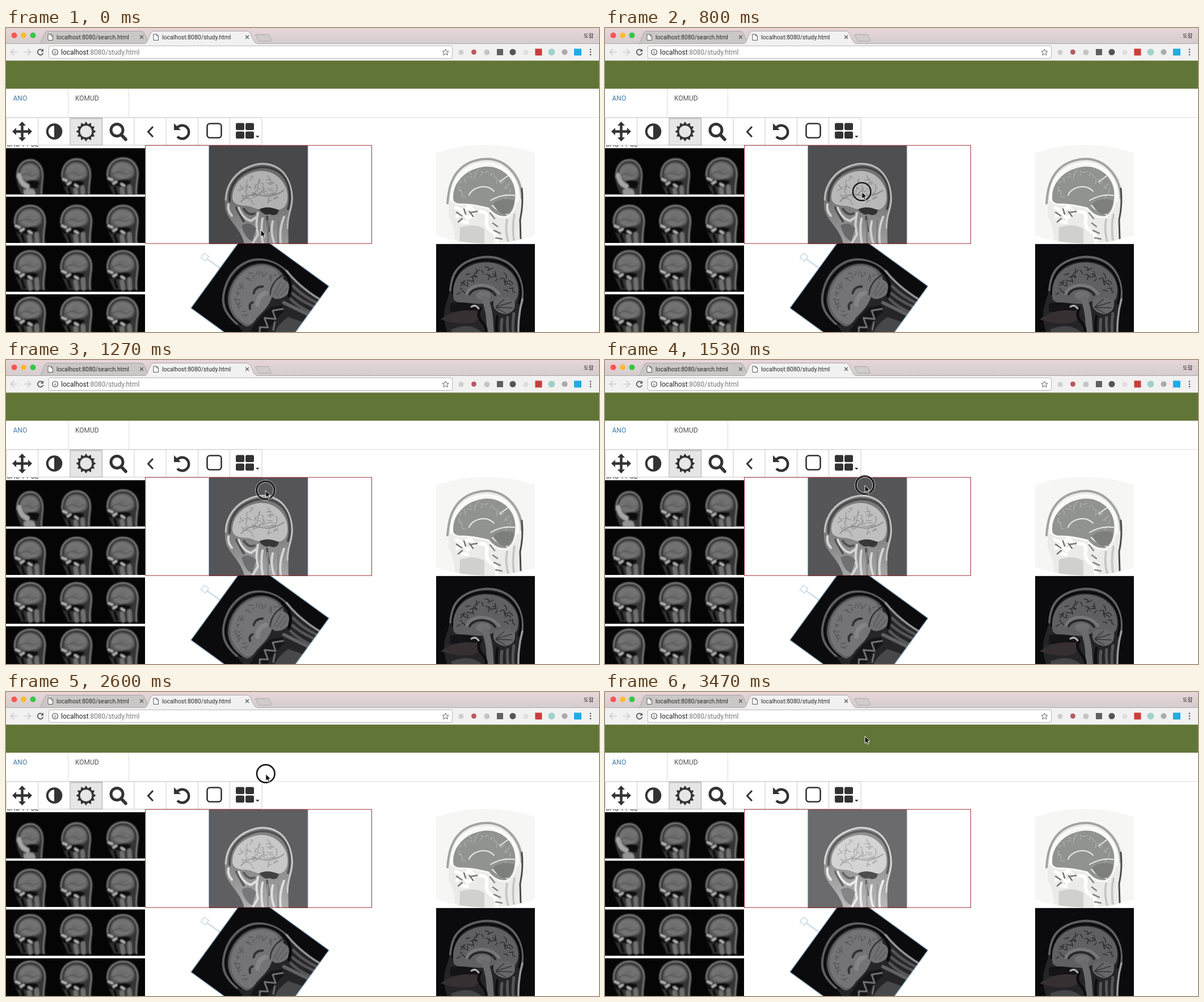
Recreate the animation shown at these times as an HTML page. Size 1045x536 px, loop 3.54 s.

```html
<!DOCTYPE html>
<html lang="en">
<head>
<meta charset="utf-8">
<title>Study viewer</title>
<style>
html, body { margin: 0; width: 100%; height: 100%; overflow: hidden; background: #fff; }
svg { display: block; width: 1045px; height: 536px; }
text { font-family: Roboto, "Noto Sans CJK KR", "Noto Sans CJK", sans-serif; }
.icon { fill: none; stroke: #333; }
.solid { fill: #333; }
.line { fill: none; stroke-linecap: round; stroke-linejoin: round; }
#pointer { animation: drag 3540ms infinite; }
#ring { animation: press 3540ms step-end infinite; }
#glow { mix-blend-mode: plus-lighter; animation: brighten 3540ms infinite; }
@keyframes drag {
  0% { transform: translate(449px, 356px); animation-timing-function: steps(7); }
  13.208% { transform: translate(449px, 329px); animation-timing-function: steps(9); }
  30.189% { transform: translate(457px, 239px); animation-timing-function: steps(7); }
  43.396% { transform: translate(458px, 218px); animation-timing-function: steps(10); }
  62.264% { transform: translate(458px, 203px); animation-timing-function: steps(10); }
  81.132% { transform: translate(457.5px, 86px); animation-timing-function: steps(9); }
  98.113%, 100% { transform: translate(458px, 77px); }
}
@keyframes press {
  0% { opacity: 0; }
  5.66% { opacity: 1; }
  92.453%, 100% { opacity: 0; }
}
@keyframes brighten {
  0% { opacity: 0; animation-timing-function: steps(7); }
  13.208% { opacity: .012; animation-timing-function: steps(9); }
  30.189% { opacity: .05; animation-timing-function: steps(7); }
  43.396% { opacity: .06; animation-timing-function: steps(10); }
  62.264% { opacity: .068; animation-timing-function: steps(10); }
  81.132% { opacity: .12; animation-timing-function: steps(9); }
  98.113%, 100% { opacity: .14; }
}
</style>
</head>
<body>
<svg viewBox="0 0 1045 536">
<defs>
  <linearGradient id="strip" x2="0" y2="1"><stop stop-color="#e8d5d7"/><stop offset="1" stop-color="#d4cdcd"/></linearGradient>
  <linearGradient id="neck" x2="0" y2="1"><stop offset=".4" stop-color="#6c6c6c"/><stop offset="1" stop-color="#989898"/></linearGradient>
  <radialGradient id="brainTone"><stop stop-color="#6a6a6a"/><stop offset=".75" stop-color="#757575"/><stop offset="1" stop-color="#555"/></radialGradient>
  <filter id="soft"><feGaussianBlur stdDeviation="1.1"/></filter>
  <filter id="fine"><feGaussianBlur stdDeviation=".7"/></filter>
  <clipPath id="frame"><rect width="174" height="174"/></clipPath>
  <clipPath id="lower"><rect x="245" y="380.5" width="800" height="156"/></clipPath>
  <clipPath id="list"><rect y="207" width="245" height="329"/></clipPath>
  <clipPath id="cell"><rect width="82" height="81.5"/></clipPath>
  <clipPath id="vignette"><path d="M0 14Q87 -14 174 14V160Q87 188 0 160Z"/></clipPath>

  <!-- small blurred slices -->
  <g id="thumbTop">
    <path d="M14 45C14 24 28 14 43 14C60 14 72 28 70 46C69 58 66 70 68 84H27C24 72 14 62 14 45Z" fill="#343434"/>
    <path d="M15 47C14 25 29 15.500 43 15.500C60 15.500 70 29 69 46C68 58 65 68 67 84" class="line" stroke="#858585" stroke-width="2.500"/>
    <path d="M20 44C22 26 32 21 43 21C56 21 65 31 63 45C58 55 47 50 39 54C30 55 20 53 20 44Z" fill="url(#brainTone)"/>
    <path d="M24 44Q36 37 42 42T57 39" class="line" stroke="#4f4f4f" stroke-width="1.600"/>
  </g>
  <g id="thumb">
    <use href="#thumbTop"/>
    <path d="M26 56Q40 51 57 56L52 66L30 65Z" fill="#111"/>
    <path d="M17 51L24 54M26 60L31 57M40 61L45 64" class="line" stroke="#b9b9b9" stroke-width="4"/>
    <path d="M17 58L23 63M28 67L32 80" class="line" stroke="#0c0c0c" stroke-width="5"/>
    <path d="M41 70L43 82M54 66L55 82" class="line" stroke="#707070" stroke-width="8"/>
  </g>
  <g id="thumbEdge">
    <use href="#thumbTop"/>
    <path d="M35 53Q50 48 62 55L58 66L41 64Z" fill="#0c0c0c"/>
    <path d="M20 43Q23 58 37 62" class="line" stroke="#a6a6a6" stroke-width="9"/>
    <path d="M29 69Q40 63 51 68L57 84H31Z" fill="#949494"/>
  </g>

  <!-- dark slices: common shell -->
  <g id="shell">
    <rect width="174" height="174" fill="#0b0a0d"/>
    <path d="M25 79C22 95 14 110 14 125C14 145 22 160 24 174H148C145 150 149 120 152 100C157 70 142 40 118 29C85 15 45 28 32 50C27 60 26 70 25 79Z" fill="#252527"/>
    <path d="M25 82C27 60 32 44 52 33C72 22 98 19 118 29C142 39 156 68 151 102" class="line" stroke="#616164" stroke-width="4"/>
    <path d="M29 88C28 66 38 42 60 34C85 25 112 28 128 41C148 56 153 83 146 105" class="line" stroke="#0b0a0c" stroke-width="4"/>
    <path d="M31 98C26 70 38 42 75 34C115 27 145 52 145 82C145 95 140 104 130 104L103 98C95 108 73 106 55 104C45 105 35 104 31 98Z" fill="#606062"/>
    <path d="M152 98Q142 134 146 176" class="line" stroke="#99999b" stroke-width="3.500"/>
    <path d="M116 133Q113 152 118 176M126 130Q124 150 130 176M137 123Q133 148 138 176" class="line" stroke="#555558" stroke-width="5"/>
  </g>

  <g id="midline" clip-path="url(#frame)"><g filter="url(#fine)">
    <use href="#shell"/>
    <g class="folds" stroke="#303032" stroke-width="1.700"></g>
    <path d="M54 88C61 69 95 67 111 88" class="line" stroke="#77777a" stroke-width="5"/>
    <path d="M59 89C65 76 93 73 104 90" class="line" stroke="#27272a" stroke-width="4"/>
    <ellipse cx="83" cy="91" rx="13" ry="8" fill="#707072"/>
    <path d="M86 97Q92 112 94 130L97 176" class="line" stroke="#6b6b6e" stroke-width="12"/>
    <path d="M101 99Q121 88 139 101Q141 122 121 124Q105 121 101 110Z" fill="#67676a"/>
    <path d="M105 111L120 98M106 111L133 103M106 112L134 113M106 113L122 122" class="line" stroke="#343437" stroke-width="1.400"/>
    <path d="M25 105Q52 100 74 110L70 120L24 120Z" fill="#141315"/>
    <path d="M8 133Q35 112 76 119Q80 137 60 140Q31 142 8 133Z" fill="#373032"/>
    <path d="M27 151Q55 139 74 151T80 175H29Z" fill="#454547"/>
    <path d="M78 114Q70 126 82 139T84 176M108 128Q104 146 110 176" class="line" stroke="#0e0d10" stroke-width="5"/>
    <path d="M62 111q7-5 13 3" class="line" stroke="#b5b5b7" stroke-width="3"/>
  </g></g>

  <g id="lateral" clip-path="url(#frame)"><g filter="url(#fine)">
    <use href="#shell"/>
    <path d="M35 97C30 72 42 45 77 37C114 31 142 54 142 82C140 94 130 99 119 98L103 103C88 109 71 107 54 104Q40 105 35 97Z" fill="#747477"/>
    <g class="folds" stroke="#525255" stroke-width="1.300"></g>
    <path d="M86 74Q97 69 105 80M60 85Q66 78 72 82" class="line" stroke="#303032" stroke-width="4"/>
    <path d="M74 91Q88 82 99 91" class="line" stroke="#858588" stroke-width="8"/>
    <path d="M100 101Q116 88 136 99Q141 117 125 124Q107 123 100 110Z" fill="#707073"/>
    <path d="M106 104L130 101M106 109L133 109M110 115L128 116" class="line" stroke="#58585a" stroke-width="1.500"/>
    <path d="M148 91Q146 111 132 121L119 127" class="line" stroke="#09090a" stroke-width="5"/>
    <path d="M101 99Q119 87 141 96" class="line" stroke="#242426" stroke-width="2"/>
    <path d="M28 109Q56 106 83 112L99 127L92 136Q59 129 23 136Z" fill="#151416"/>
    <path d="M31 127L44 118L52 130L62 115L72 132L81 119L94 132M54 140L67 134" class="line" stroke="#747477" stroke-width="3"/>
    <path d="M33 151Q59 137 88 148L96 175H36Z" fill="#48484a"/>
    <path d="M104 127L112 173" class="line" stroke="#626264" stroke-width="6"/>
  </g></g>

  <path id="arrow" d="M0 0V12.5L2.9 9.8L4.9 14.2L7 13.2L5 9H9Z"/>
  <g id="doc"><path d="M0 0H5.5L8.5 3V10.5H0Z" fill="#fff" stroke="#555"/><path d="M5.5 0V3H8.5" fill="none" stroke="#555"/></g>
  <path id="close" d="M-3-3L3 3M3-3L-3 3" fill="none" stroke="#555" stroke-width="1.2"/>
</defs>

<rect width="1045" height="536" fill="#fff"/>

<!-- browser -->
<rect width="1045" height="28" fill="url(#strip)"/>
<circle cx="14.500" cy="13" r="5" fill="#fc5551"/><circle cx="31" cy="13" r="5" fill="#fdbc34"/><circle cx="47.500" cy="13" r="5" fill="#33c748"/>
<path d="M59 27.5C64 27 66 8 72 5.500H239C246 6 248 27 254 27.500Z" fill="#cbc7c7" stroke="#a8a3a3"/>
<path d="M440 11.500H460Q463 11.500 464 14L467 21Q467 23.500 465 23.500H448Q445 23.500 444 21L440 13Z" fill="#d1cccc" stroke="#aaa5a5"/>
<rect y="27.500" width="1045" height="30" fill="#f2f1f1"/>
<path d="M0 27.500H245C251 26 252 8 259 5.500H426C433 8 435 26 442 27.500H1045" fill="#f2f1f1" stroke="#aaa5a5"/>
<path d="M246 28H441" stroke="#f2f1f1" stroke-width="2"/>
<use href="#doc" x="74" y="11"/><use href="#doc" x="260" y="11"/>
<g font-size="10.450" fill="#2a2a2a"><text x="89" y="20">localhost:8080/search.html</text><text x="275" y="20">localhost:8080/study.html</text></g>
<use href="#close" x="239" y="16"/><use href="#close" x="425" y="16"/>
<text x="1018" y="17" font-size="9.500" fill="#222">도람</text>
<path d="M20 42.500H9M14 37L8.500 42.500L14 48M32 42.500H43M38 37L43.500 42.500L38 48" fill="none" stroke="#cbcbcb" stroke-width="1.600"/>
<path d="M64.200 39A5 5 0 1 0 65.500 44" fill="none" stroke="#555" stroke-width="1.700"/><path d="M66 36.500V41.500H61Z" fill="#555"/>
<rect x="75.500" y="31.500" width="711" height="22" rx="2.500" fill="#fff" stroke="#b9b7b7"/>
<circle cx="86.500" cy="42.500" r="5" fill="none" stroke="#555" stroke-width="1.200"/><path d="M86.500 42V45.500M86.500 39.500V40.800" stroke="#555" stroke-width="1.300"/>
<text x="97" y="46.500" font-size="11.900" fill="#222">localhost<tspan fill="#777">:8080/study.html</tspan></text>
<path d="M774.500 37L776.100 40.900L780.200 41.200L777 43.800L778.100 47.900L774.500 45.600L770.900 47.900L772 43.800L768.800 41.200L772.900 40.900Z" fill="none" stroke="#666"/>
<circle cx="802" cy="43" r="4.500" fill="#cecece"/><circle cx="824.500" cy="42.500" r="4.500" fill="#b65a62"/>
<circle cx="847.500" cy="43" r="5" fill="#c4c4c4"/><rect x="865" y="37" width="11" height="11" fill="#606060"/>
<circle cx="893" cy="42.500" r="5.500" fill="#555"/><circle cx="916" cy="43" r="4.500" fill="#dedede"/>
<rect x="932.500" y="36.500" width="12" height="12" fill="#c83f3b"/><circle cx="961.500" cy="42.500" r="6" fill="#a1d0cc"/>
<circle cx="984.500" cy="42.500" r="5" fill="#aaa"/><rect x="1001" y="36.500" width="13" height="12" fill="#21abe4"/>
<g fill="#555"><circle cx="1030" cy="38" r="1.300"/><circle cx="1030" cy="42.500" r="1.300"/><circle cx="1030" cy="47" r="1.300"/></g>

<!-- page header -->
<rect y="57.500" width="1045" height="49.500" fill="#617536"/>
<path d="M109.500 107V157M216.500 107V157M0 157.500H1045" stroke="#dedede"/>
<text x="12.500" y="127.500" font-size="12" fill="#427ba8">ANO</text><text x="122" y="127.500" font-size="12" fill="#555">KOMUD</text>

<!-- tools -->
<rect x=".5" y="158" width="450.500" height="48.500" rx="3" fill="#fff" stroke="#ccc"/>
<rect x="113" y="158.500" width="56.500" height="48" fill="#e6e6e6" stroke="#adadad"/>
<path d="M114 160H169" stroke="#d2d2d2" stroke-width="2"/>
<path d="M56.500 158V206M226 158V206M282 158V206M338.500 158V206M394.500 158V206" stroke="#ccc"/>
<path d="M28.500 170V195M16 182.500H41" class="icon" stroke-width="4.500"/>
<path class="solid" d="M28.500 165L35 172H22ZM28.500 200L35 193H22ZM11 182.500L18 176V189ZM46 182.500L39 176V189Z"/>
<circle cx="85" cy="182.500" r="12.300" class="icon" stroke-width="4"/><path class="solid" d="M85 171A11.500 11.500 0 0 1 85 194Z"/>
<path id="sun" class="solid" fill-rule="evenodd"/>
<circle cx="195.500" cy="180" r="10.500" class="icon" stroke-width="5"/><path d="M203 188L211 196.500" class="icon line" stroke-width="5.500"/>
<path d="M259 174L250.500 183L259 192" class="icon" stroke-width="3"/>
<path d="M301.500 176A11.700 11.700 0 1 1 302 191.500" class="icon" stroke-width="4.500"/><path class="solid" d="M296 168V180H308Z"/>
<rect x="354.500" y="168.500" width="25" height="25" rx="5" class="icon" stroke-width="2.600"/>
<g class="solid"><rect x="405" y="167.500" width="15" height="12.500" rx="2.500"/><rect x="422" y="167.500" width="15" height="12.500" rx="2.500"/><rect x="405" y="182.500" width="15" height="12.500" rx="2.500"/><rect x="422" y="182.500" width="15" height="12.500" rx="2.500"/><path d="M440 190H446.500L443.200 193.500Z"/></g>

<!-- series list -->
<g clip-path="url(#list)"><text x="1" y="208.800" font-size="12" fill="#333">SAG T1 SE</text><g id="series"></g></g>

<!-- upper left view -->
<g style="isolation:isolate">
  <g transform="translate(358 207)" clip-path="url(#frame)">
    <rect width="174" height="174" fill="#484749"/>
    <g filter="url(#fine)">
      <path d="M29 88C31 67 46 45 72 36C91 27 113 30 129 45C144 60 150 86 146 106C143 121 138 132 140 174H62C58 154 44 141 35 127C27 115 27 103 29 88Z" fill="url(#neck)"/>
      <path d="M29 96C30 67 48 46 72 37C91 29 113 31 128 45C143 60 149 86 145 106C142 121 137 130 138 146" class="line" stroke="#b4b4b4" stroke-width="3"/>
      <path d="M36 98C34 69 53 49 75 42C96 34 117 39 130 53C143 68 145 94 139 112" class="line" stroke="#3c3b3d" stroke-width="4"/>
      <path d="M41 94C40 72 56 53 79 47C104 40 127 53 136 76C141 94 138 109 125 113C113 114 104 109 96 112C85 115 78 108 68 107C58 106 43 106 41 94Z" fill="#b1b1b1"/>
      <g class="folds" stroke="#888" stroke-width="1.400"></g>
      <path d="M56 99Q72 82 91 88T132 79" class="line" stroke="#7c7c7c" stroke-width="1.700"/>
      <path d="M88 113Q102 105 123 114Q120 127 106 121Q98 125 88 113Z" fill="#2a2a2b"/>
      <path d="M48 110Q54 122 61 134M61 112Q70 125 80 120M102 126L105 151" class="line" stroke="#454446" stroke-width="4"/>
      <path d="M34 104Q32 115 40 124M52 110Q60 130 74 133L84 126M86 119Q81 140 86 157L77 172" class="line" stroke="#c9c9c9" stroke-width="4"/>
      <path d="M57 141Q71 132 83 146L76 169Q63 164 57 141Z" fill="#626163"/>
      <path d="M94 129Q90 151 95 176M112 134Q107 154 116 176M132 126Q122 151 127 176" class="line" stroke="#c9c9c9" stroke-width="4"/>
      <path d="M103 133L104 176M122 132L121 176" class="line" stroke="#777" stroke-width="3"/>
    </g>
  </g>
  <rect id="glow" x="358" y="207" width="174" height="173" fill="#fff"/>
</g>
<path d="M357.500 208V380M532 208V380" stroke="#8eacc4"/>
<rect x="245.500" y="207" width="399" height="173" fill="none" stroke="#9e2c34"/>

<!-- upper right view -->
<g transform="translate(758 206)" clip-path="url(#vignette)">
  <rect width="174" height="174" fill="#f6f7f4"/>
  <g filter="url(#fine)">
    <path d="M23 93C24 55 48 27 87 24C127 23 154 51 152 91L147 174H33Q34 145 22 126Z" fill="#ebece9"/>
    <path d="M20 103C22 79 26 58 43 42C58 28 79 24 95 25C128 29 151 60 151 94" class="line" stroke="#a1a39f" stroke-width="4"/>
    <path d="M151 77Q154 105 148 132L149 165" class="line" stroke="#4c4d4b" stroke-width="3"/>
    <path d="M27 99C25 65 46 37 83 33C120 29 148 61 144 99" class="line" stroke="#fdfdfb" stroke-width="4"/>
    <path d="M29 98C25 69 48 42 84 37C117 34 140 58 141 87C141 104 138 121 124 127C111 129 100 122 92 112Q61 104 43 105Q32 105 29 98Z" fill="#91938f" stroke="#fafaf8" stroke-width="3"/>
    <g class="folds" stroke="#b2b4b0" stroke-width="1.200"></g>
    <path d="M58 89C64 73 91 68 102 82M96 98Q116 86 138 89M99 107Q109 118 126 123M112 65L126 55" class="line" stroke="#e9ebe7" stroke-width="2"/>
    <path d="M101 103Q117 91 137 98Q137 117 121 123Q106 119 101 103Z" fill="#7d7f7b"/>
    <path d="M35 111L47 116L59 109L67 118M37 126L48 120L56 130L64 123M44 135L55 137" class="line" stroke="#fff" stroke-width="6"/>
    <path d="M36 119L45 125M49 113L52 122M59 118L65 126M62 119L76 117M39 136L46 130" class="line" stroke="#737571" stroke-width="2.500"/>
    <path d="M76 118Q92 116 89 132T104 156L108 174" class="line" stroke="#fff" stroke-width="6"/>
    <path d="M95 120L103 130M100 138L108 144M102 151L113 156M105 164L116 166" class="line" stroke="#82847f" stroke-width="2.500"/>
    <path d="M42 146Q66 137 85 148V174H41Z" fill="#d0d1cd"/>
    <path d="M125 132Q121 151 128 174M138 123Q133 147 138 174" class="line" stroke="#c7c8c4" stroke-width="4"/>
  </g>
</g>

<!-- lower views -->
<g clip-path="url(#lower)">
  <use href="#midline" transform="translate(758 380.500)"/>
  <g transform="translate(447.500 474.500) rotate(-54)">
    <use href="#lateral" transform="translate(-87 -87)"/>
    <rect x="-87" y="-87" width="174" height="174" fill="none" stroke="#83add1"/>
    <path d="M0-87V-115" stroke="#83add1"/><rect x="-5" y="-125" width="10" height="10" fill="none" stroke="#a9c7dd"/>
  </g>
</g>

<g id="pointer">
  <g id="ring" fill="none" transform="translate(0 -.5)"><circle r="17.500" stroke="#fff" stroke-opacity=".8"/><circle r="14" stroke="#fff" stroke-opacity=".8"/><circle r="15.800" stroke="#080808" stroke-width="2.500"/></g>
  <use href="#arrow" fill="#080808" stroke="#fff" stroke-width="1"/>
</g>
</svg>
<script>
const pick = q => document.querySelector(q);
const round = n => n.toFixed(1);
let seed = 7;
const random = () => (seed = seed * 16807 % 2147483647) / 2147483647;

// Sunburst with a round opening
const points = Array.from({ length: 24 }, (_, i) => {
  const a = i * Math.PI / 12, r = i % 2 ? 13.2 : 17.5;
  return `${round(141 + r * Math.sin(a))} ${round(182.5 - r * Math.cos(a))}`;
});
pick('#sun').setAttribute('d', `M${points.join('L')}ZM151.500 182.500A10.500 10.500 0 1 0 130.500 182.500A10.500 10.500 0 1 0 151.500 182.500Z`);

// Short wavy grooves over the upper part of a brain, from an inner radius to its rim
function folds(cx, cy, rx, ry, inner, count) {
  let d = '';
  for (let i = 0; i < count; i++) {
    const a = Math.PI * (1 + (i + random()) / count);
    const k = inner + (.93 - inner) * random();
    const turn = a + (random() - .5) * 2.4, len = 5 + 6 * random(), bend = 8 * (random() - .5);
    const dx = -len * Math.cos(turn), dy = -len * Math.sin(turn);
    d += `M${round(cx + rx * k * Math.cos(a))} ${round(cy + ry * k * Math.sin(a))}`
      + `q${round(dx / 2 - bend)} ${round(dy / 2 + bend)} ${round(dx)} ${round(dy)}`;
  }
  return `<path class="line" d="${d}"/>`;
}
const brains = [[87, 89, 56, 54, .6, 34], [88, 90, 52, 52, .8, 24], [89, 97, 47, 51, .25, 48], [85, 92, 55, 54, .7, 20]];
document.querySelectorAll('.folds').forEach((g, i) => g.innerHTML = folds(...brains[i]));

// Four strips of three slices
let strips = '';
for (let row = 0; row < 4; row++) {
  const y = [212, 297.5, 383.5, 469.5][row];
  strips += `<rect y="${y}" width="245" height="81.500" fill="#050505"/>`;
  for (let col = 0; col < 3; col++) {
    const s = row ? 1 : [.85, .93, 1][col], lift = [2, 0, -6, -10][row];
    const shift = `translate(${round(42 - 42 * s)} ${round(lift + (1 - s) * 20)}) scale(${s} 1)`;
    const slice = row + col ? 'thumb' : 'thumbEdge';
    strips += `<g transform="translate(${col * 81.7} ${y})" clip-path="url(#cell)"><use href="#${slice}" transform="${shift}" filter="url(#soft)"/></g>`;
  }
}
pick('#series').innerHTML = strips;
</script>
</body>
</html>
```
